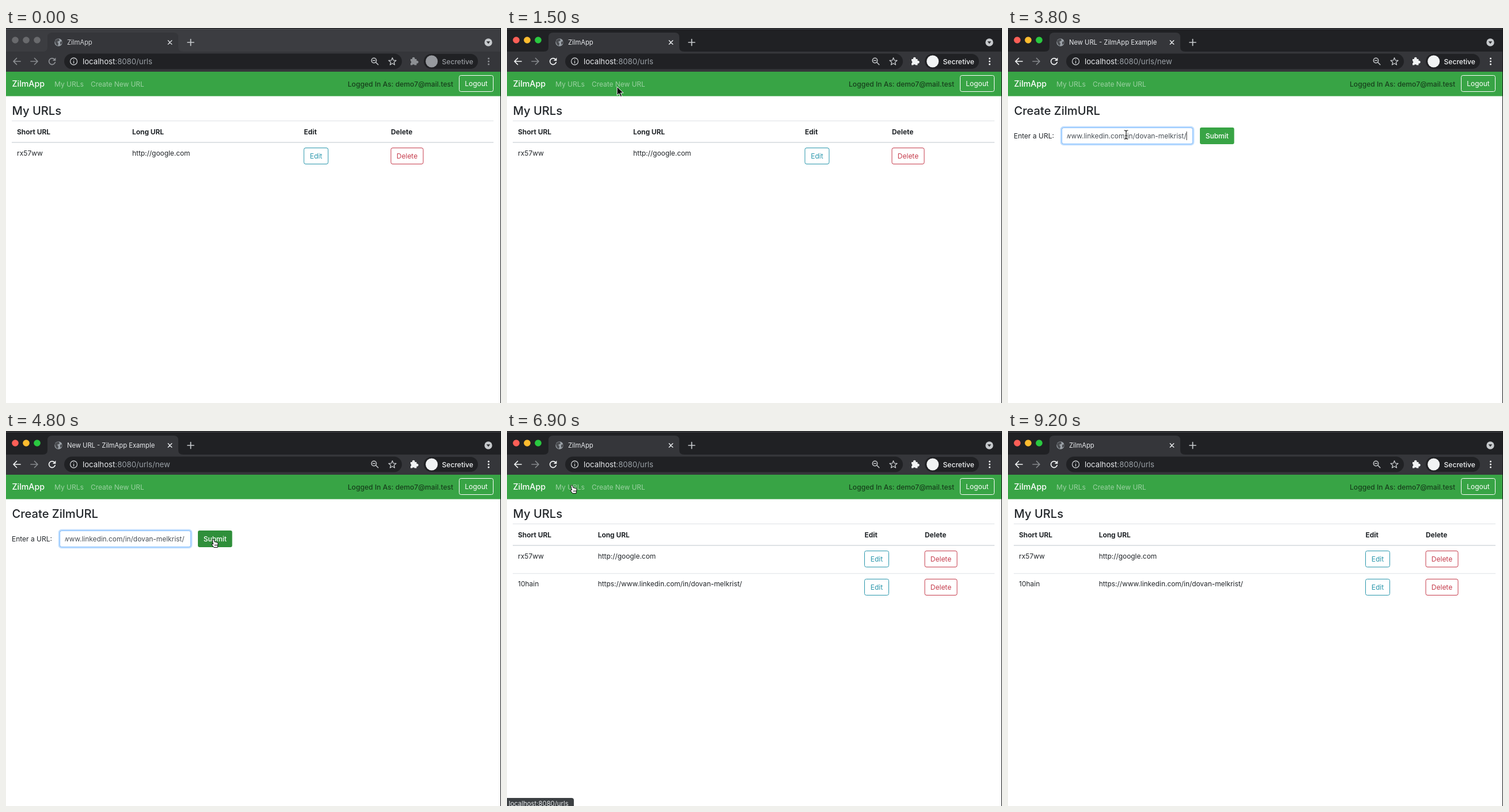
These frames come from a looping animation (859 px wide and 652 px high, 9400 ms). An HTML page:

```html
<!DOCTYPE html>
<html lang="en">
<head>
<meta charset="utf-8">
<title>ZilmApp</title>
<style>
  html, body { margin: 0; width: 100%; height: 100%; overflow: hidden; background: #fff; }
  svg { display: block; --strip: #3c3d41; --icon: #8d9094; --title: #d3d5d8; --name: #96999e; --red: #696a6d; --yellow: #696a6d; --green: #696a6d; }
  svg.active { --strip: #202124; --icon: #f1f3f4; --title: #e8eaed; --name: #f1f3f4; --red: #fc5f57; --yellow: #fdbc2f; --green: #2ac940; }
  text { font: 12px Inter, "Open Sans", sans-serif; fill: #212529; white-space: pre; }
  .medium { font-weight: 500; }
  .bold { font-weight: 700; }
  .line { fill: none; stroke-linecap: round; stroke-linejoin: round; }
</style>
</head>
<body>
<script>
const LOOP = 9400, STEP = 100;
const GREEN = '#38a445', TEAL = '#2896ac', RED = '#c53b4b', INK = '#212529', MUTED = '#6c757d';
const HOST = 'localhost', PORT = ':8080';
const LONG_URL = 'https://www.linkedin.com/in/dovan-melkrist/';

const text = (x, y, str, { size = 12, fill = INK, anchor = 'start', cls = '', id = '' } = {}) =>
  `<text x="${x}" y="${y}" ${id && `id="${id}"`} class="${cls}" text-anchor="${anchor}" style="font-size:${size}px;fill:${fill}">${str}</text>`;
const rect = (x, y, w, h, fill, extra = '') =>
  `<rect x="${x}" y="${y}" width="${w}" height="${h}" fill="${fill}" ${extra}/>`;
const circle = (x, y, r, fill, extra = '') => `<circle cx="${x}" cy="${y}" r="${r}" fill="${fill}" ${extra}/>`;
const stroke = (d, color, width = 1.7) => `<path class="line" d="${d}" stroke="${color}" stroke-width="${width}"/>`;
const group = (id, body, extra = '') => `<g id="${id}" ${extra}>${body}</g>`;

const outlineButton = (x, y, w, label, color) =>
  rect(x + .5, y + .5, w - 1, 28, 'none', `rx="3" stroke="${color}"`) +
  text(x + w / 2, y + 19, label, { fill: color, anchor: 'middle' });
const solidButton = (x, y, w, label, id) =>
  rect(x, y, w, 29, GREEN, `rx="3" id="${id}"`) +
  text(x + w / 2, y + 19, label, { fill: '#fff', anchor: 'middle', cls: 'medium' });
const field = (x, y) => rect(x + .5, y + .5, 227, 28, '#fff', 'rx="3" stroke="#ced4da"');
const clip = (id, x, y) => `<clipPath id="${id}">${rect(x, y, 208, 26, '#000')}</clipPath>`;

function star(cx, cy, r) {
  const points = Array.from({ length: 10 }, (_, i) => {
    const a = i * Math.PI / 5, d = i % 2 ? r * .43 : r;
    return `${cx + d * Math.sin(a)} ${cy - d * Math.cos(a)}`;
  });
  return stroke(`M${points.join('L')}Z`, '#c7cacd', 1.3);
}

function browser() {
  const icon = 'var(--icon)', soft = '#c7cacd', dim = '#85888c';
  const lights = ['red', 'yellow', 'green'].map((c, i) => circle(16 + 19 * i, 21, 5.8, `var(--${c})`));
  const dots = [53, 58, 63].map(y => circle(837.5, y, 1.5, icon));
  return rect(0, 0, 859, 76, 'var(--strip)') + rect(0, 0, 859, 1, '#0c0c0d') + rect(0, 1, 859, 1, '#55575a') +
    lights.join('') +
    `<path d="M64 41Q72 41 72 33V16Q72 8 80 8H291Q299 8 299 16V33Q299 41 307 41Z" fill="#35363a"/>` +
    rect(0, 41, 859, 35, '#35363a') +
    circle(91, 25, 6.7, '#9aa0a6') +
    `<path d="M85 22Q89 18 92 19L93 22L89 24L91 27L90 31Q85 29 85 22ZM94 24L97.5 23V27L94 29Z" fill="#4a4c50"/>` +
    text(106, 28.5, '', { size: 11.2, fill: 'var(--title)', id: 'title' }) +
    stroke('M281.3 21.8L287.7 28.2M287.7 21.8L281.3 28.2', 'var(--title)', 1.5) +
    stroke('M315 25H326M320.5 19.5V30.5', soft, 1.7) +
    circle(837, 25, 6.7, soft) + `<path d="M833.7 23.3H840.3L837 27.6Z" fill="#303134"/>` +
    stroke('M25 58H13.5M18.5 52.5L13 58L18.5 63.5', icon) +
    stroke('M43 58H54.5M49.5 52.5L55 58L49.5 63.5', dim) +
    stroke('M84 54.5A5.4 5.4 0 1 0 85.2 59.5', icon) + `<path d="M86.3 51.5V57H80.8Z" fill="${icon}"/>` +
    rect(101, 44.5, 586, 27, '#202124', 'rx="13.5"') +
    circle(117.5, 58, 6, 'none', `stroke="${soft}" stroke-width="1.3"`) +
    stroke('M117.5 57.6V61M117.5 54.9V55.1', soft, 1.4) +
    `<text x="133" y="62.5" style="font-size:13.2px;fill:#e8eaed">${HOST}<tspan id="address" fill="#9aa0a6"></tspan></text>` +
    circle(638.5, 56.5, 4.2, 'none', `stroke="${soft}" stroke-width="1.5"`) +
    stroke('M641.8 59.8L645.8 63.8M636.7 56.5H640.3', soft, 1.5) +
    star(670.5, 58.5, 6.8) +
    `<path d="M702 54H705A2.4 2.4 0 1 1 709.4 54H712.5V57A2.4 2.4 0 1 1 712.5 61.5V64.5H709A2.2 2.2 0 0 0 705 64.5H702V61.2A2.2 2.2 0 0 0 702 57.2Z" fill="${icon}"/>` +
    rect(725, 45, 94, 26, '#202124', 'rx="13"') +
    circle(738.7, 58, 10.5, 'var(--name)') +
    text(756.5, 62.5, 'Secretive', { size: 12.1, fill: 'var(--name)', cls: 'medium' }) +
    dots.join('');
}

const navbar = () =>
  rect(0, 76, 859, 42.5, GREEN) +
  text(10.5, 102, 'ZilmApp', { size: 14.2, fill: '#fff', cls: 'medium' }) +
  text(84, 101.5, 'My URLs', { fill: '#fff', id: 'linkList' }) +
  text(147, 101.5, 'Create New URL', { size: 11.9, fill: '#fff', id: 'linkNew' }) +
  text(593, 101.5, 'Logged In As: demo7@mail.test', { size: 12.1, fill: '#173f1c', cls: 'medium' }) +
  outlineButton(786, 82, 60, 'Logout', '#fff');

const heading = str => text(10.5, 150.5, str, { size: 20.1, cls: 'medium' });

function table([urlX, editX, deleteX], rows) {
  const heads = [[19, 'Short URL'], [urlX, 'Long URL'], [editX, 'Edit'], [deleteX, 'Delete']];
  return heading('My URLs') + rect(10, 161, 836, 1, '#dee2e6') + rect(10, 198, 836, 1.7, '#d9dde1') +
    heads.map(([x, str]) => text(x, 185, str, { size: 11.9, cls: 'bold' })).join('') +
    rows.map(([id, url], i) => {
      const y = 48.3 * i;
      return (i ? rect(10, 199 + y, 836, 1, '#dee2e6') : '') +
        text(19, 222 + y, id) + text(urlX, 222 + y, url, { size: 11.9 }) +
        outlineButton(editX - .5, Math.round(208.4 + y), 43, 'Edit', TEAL) +
        outlineButton(deleteX - .5, Math.round(208.4 + y), 57, 'Delete', RED);
    }).join('');
}

const createPage = () =>
  heading('Create ZilmURL') + text(10, 191.5, 'Enter a URL:') + field(93, 173) +
  group('focus',
    rect(92, 172, 230, 31, 'none', 'rx="4.5" stroke="#007bff" stroke-opacity=".25" stroke-width="2.6"') +
    rect(93.5, 173.5, 227, 28, 'none', 'rx="3" stroke="#80bdff"')) +
  clip('createClip', 102.5, 174) +
  group('empty', text(103, 191.5, 'http://', { fill: '#495057' })) +
  group('pasted', text(309.5, 191.5, LONG_URL, { size: 11.9, fill: '#495057', anchor: 'end' }), 'clip-path="url(#createClip)"') +
  rect(309.5, 180, 1, 15, '#333', 'id="caret"') +
  solidButton(333, 173, 59.5, 'Submit', 'submit');

const detailPage = () =>
  rect(0, 118.5, 859, 217, '#f7f7f7') + rect(0, 138, 859, 76, '#fff') +
  [137, 214, 335].map(y => rect(0, y, 859, 1, '#dcdcdc')).join('') +
  text(428, 167.5, `ZilmURL for: ${LONG_URL}`, { size: 14.6, anchor: 'middle', cls: 'medium' }) +
  text(428, 194.3, 'Short URL: <tspan fill="#2a6fcb">10hain</tspan>', { anchor: 'middle' }) +
  text(428, 253, 'Edit', { size: 29, fill: MUTED, anchor: 'middle', cls: 'medium' }) +
  text(244, 297, 'New URL:', { fill: MUTED }) + field(311, 278) +
  clip('detailClip', 320.5, 279) +
  group('value', text(321.5, 297, LONG_URL, { size: 11.9, fill: '#495057' }), 'clip-path="url(#detailClip)"') +
  solidButton(551, 278, 61.5, 'Update', 'update');

const cursors =
  group('arrow', '<path d="M0 0V15L3.5 11.8L6 17.5L8.6 16.4L6.1 10.9H11Z" fill="#000" stroke="#fff"/>') +
  group('hand', '<path d="M-3.6-5.2C-2.6-6.3-1.3-5.6-1-4.3L-.4-1.5L4 -.5C5.6 0 6 1 5.8 2.6L5 8.5H-1.2L-4.6 4C-5.5 2.4-4.2 1.6-2.9 2.5L-2.4 2.9L-4-3.8Z" fill="#fff" stroke="#000"/><path d="M.6 3V6M2.3 3V6M4 3V6" stroke="#000" stroke-width=".7"/>') +
  group('beam', stroke('M-3-7Q0-7 0-5Q0-7 3-7M0-5V6M-3 8Q0 8 0 6Q0 8 3 8M-1.5 2H1.5', '#fff', 2.6) +
    stroke('M-3-7Q0-7 0-5Q0-7 3-7M0-5V6M-3 8Q0 8 0 6Q0 8 3 8M-1.5 2H1.5', '#111', 1.2));

const firstRow = ['rx57ww', 'http://google.com'];
document.body.innerHTML = `<svg xmlns="http://www.w3.org/2000/svg" width="859" height="652" viewBox="0 0 859 652">` +
  rect(0, 0, 859, 652, '#fff') + browser() + navbar() +
  group('list', table([219, 517, 668], [firstRow])) +
  group('create', createPage()) +
  group('detail', detailPage()) +
  group('full', table([157.7, 620.5, 725], [firstRow, ['10hain', LONG_URL]])) +
  group('status', '<path id="bubble" fill="#3c4043"/>' + text(3, 652, '', { size: 11.3, fill: '#e8eaed', id: 'statusText' })) +
  rect(858, 0, 1, 652, '#17181a') + group('cursor', cursors) + '</svg>';

// Each page: start time, group, tab title, path.
const PAGES = [
  [0, 'list', 'ZilmApp', '/urls'],
  [2100, 'create', 'New URL - ZilmApp Example', '/urls/new'],
  [5100, 'detail', 'URL - ZilmApp Example', '/urls/10hain'],
  [6900, 'full', 'ZilmApp', '/urls'],
];
// Pointer: time, x, y, shape from then on.
const POINTER = [
  [600, 226, 308, 'arrow'], [700, 192, 164, 'arrow'], [800, 192, 164, 'arrow'], [900, 190, 125, 'arrow'],
  [1100, 191, 102, 'arrow'], [1700, 191, 102, 'hand'], [2500, 191, 102, 'hand'], [2600, 196, 132, 'arrow'],
  [2700, 203, 174, 'beam'], [2800, 205, 185, 'beam'], [3800, 205, 185, 'beam'], [4200, 325, 194, 'arrow'],
  [4300, 350, 195, 'hand'], [4400, 362, 194, 'hand'], [5100, 362, 194, 'arrow'], [5700, 362, 194, 'arrow'],
  [5900, 230, 112, 'arrow'], [6000, 203, 102, 'hand'], [6100, 203, 102, 'hand'], [6500, 115, 100, 'hand'],
  [7100, 115, 100, 'hand'], [7200, 122, 120, 'arrow'], [7900, 255, 291, 'arrow'], [8100, 255, 291, 'arrow'],
  [8500, 630, 452, 'arrow'], [8600, 630, 452, 'arrow'], [9200, 800, 670, 'arrow'],
];

const $ = id => document.getElementById(id);
const show = (id, on) => { $(id).style.display = on ? '' : 'none'; };
const within = (t, a, b) => t >= a && t < b;
const ramp = (t, a, b) => Math.min(1, Math.max(0, (t - a) / (b - a)));

function drawPointer(t) {
  const i = POINTER.findLastIndex(key => key[0] <= t);
  const visible = i >= 0 && i < POINTER.length - 1;
  show('cursor', visible);
  if (!visible) return;
  const [t0, x0, y0, shape] = POINTER[i], [t1, x1, y1] = POINTER[i + 1];
  const k = ramp(t, t0, t1);
  $('cursor').setAttribute('transform', `translate(${x0 + (x1 - x0) * k} ${y0 + (y1 - y0) * k})`);
  ['arrow', 'hand', 'beam'].forEach(id => show(id, id === shape));
}

function drawStatus(t) {
  const early = t < 5000, toList = t >= 6500;
  const opacity = early ? ramp(t, 1900, 2100) * (1 - ramp(t, 2400, 2600))
                        : ramp(t, 6000, 6300) * (1 - ramp(t, 7100, 7400));
  const width = toList ? 116 : 140;
  $('status').style.opacity = opacity;
  $('statusText').textContent = HOST + PORT + (toList ? '/urls' : '/urls/new');
  $('bubble').setAttribute('d', `M0 638H${width - 4}Q${width} 638 ${width} 642V652H0Z`);
}

function draw(now) {
  const t = Math.floor(now % LOOP / STEP) * STEP;
  const [, current, title, path] = PAGES.findLast(page => page[0] <= t);
  PAGES.forEach(([, id]) => show(id, id === current));
  $('title').textContent = title;
  $('address').textContent = PORT + path;
  document.querySelector('svg').classList.toggle('active', t >= 1500);

  $('linkNew').style.fillOpacity = within(t, 1700, 2100) || within(t, 6000, 6300) ? .75 : .5;
  $('linkList').style.fillOpacity = within(t, 6500, 6900) ? .75 : .5;

  $('focus').style.opacity = ramp(t, 3100, 3400);
  show('empty', t < 3800);
  show('pasted', t >= 3800);
  show('caret', within(t, 3200, 4800));
  $('caret').setAttribute('x', t < 3800 ? 138.5 : 309.5);
  $('submit').setAttribute('fill', t >= 4400 ? '#2f8f3a' : GREEN);

  drawStatus(t);
  drawPointer(t);
}

const start = performance.now();
function tick() {
  draw(performance.now() - start);
  requestAnimationFrame(tick);
}
tick();
</script>
</body>
</html>
```
